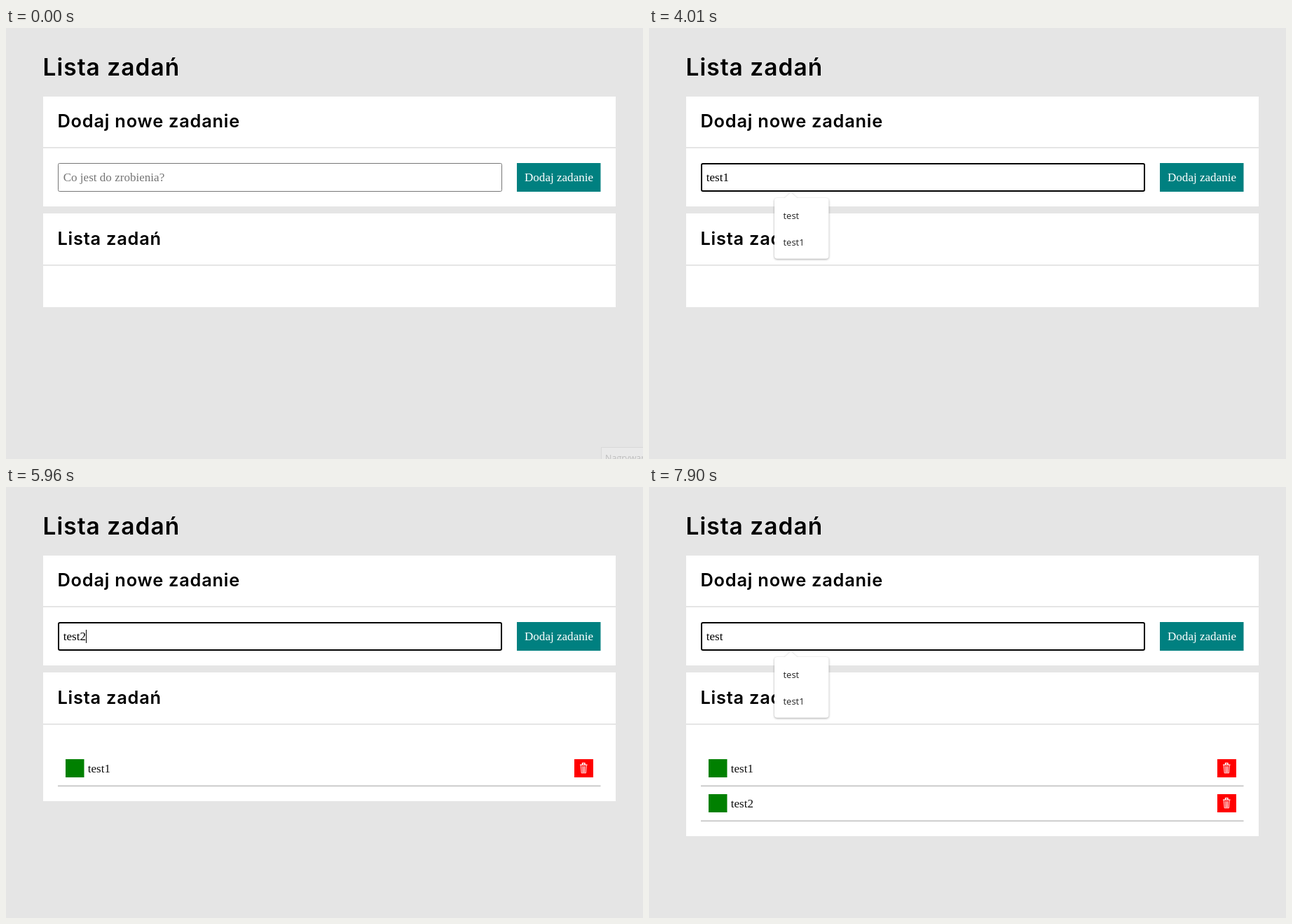
An HTML page for the animation above (7990 ms loop, 909 by 616 pixels).

```html
<!DOCTYPE html>
<html lang="pl">
<head>
<meta charset="utf-8">
<title>Lista zadań</title>
<style>
  html, body { margin: 0; width: 100%; height: 100%; overflow: hidden; background: #e5e5e5; }
  svg { display: block; width: 909px; height: 616px; font: 17.07px "Liberation Serif", serif; }
  h1, .title { font-family: Inter, sans-serif; font-weight: 600; letter-spacing: .03em; }
  .main { font-size: 33.5px; }
  .section { font-size: 25.4px; }
  .ui { font: 13px "Open Sans", sans-serif; fill: #222; }
  #popup { filter: drop-shadow(0 1px 1.5px rgba(0, 0, 0, .35)); }
  #toast { font-size: 12.5px; fill: #bdbdbd; }
</style>
</head>
<body>
<svg viewBox="0 0 909 616">
  <defs>
    <g id="row">
      <rect x="85" y="389" width="26.5" height="26" fill="green"/>
      <rect x="811" y="389" width="27" height="26" fill="red"/>
      <g fill="none" stroke="#fff">
        <path d="M819 397.2h10.5M822.5 396.5v-1.8h3.5v1.8" stroke-width="1.3"/>
        <path d="M820.3 398l.9 10.8h6.2l.9-10.8M822.6 399l.3 9M824.3 399v9M826 399l-.3 9" stroke-width=".9"/>
      </g>
      <rect x="74" y="426.6" width="774.5" height="1.4" fill="#bbb"/>
    </g>
  </defs>

  <rect width="909" height="616" fill="#e5e5e5"/>
  <text class="title main" x="52.5" y="68">Lista zadań</text>

  <g fill="#fff">
    <rect x="53" y="98" width="817" height="72"/>
    <rect x="53" y="172" width="817" height="83"/>
    <rect x="53" y="265" width="817" height="73"/>
    <rect id="list" x="53" y="340" width="817" height="59"/>
  </g>
  <text class="title section" x="73.5" y="142">Dodaj nowe zadanie</text>
  <text class="title section" x="73.5" y="310">Lista zadań</text>

  <rect id="field" fill="#fff"/>
  <text id="hint" x="81.7" y="219" fill="#757575">Co jest do zrobienia?</text>
  <text id="typed" x="81.7" y="219"></text>
  <rect id="caret" y="204" width="1" height="19"/>

  <rect x="729" y="193" width="119.5" height="41" fill="teal"/>
  <text x="740" y="219" fill="#fff">Dodaj zadanie</text>

  <g class="row"><use href="#row"/><text x="116.7" y="408" fill="#111">test1</text></g>
  <g class="row"><use href="#row" y="50"/><text x="116.7" y="458" fill="#111">test2</text></g>

  <g id="popup">
    <path d="M192.5 244l10-9 10 9z" fill="#fff"/>
    <rect id="box" x="179" y="243" rx="4" fill="#fff"/>
    <g id="items" class="ui"></g>
  </g>

  <g id="toast">
    <rect x="849.5" y="599.5" width="70" height="30" fill="#e9e9e9" stroke="#d9d9d9"/>
    <text class="ui" x="855" y="618.5" style="font-size:12.5px;fill:#bdbdbd">Nagrywanie</text>
  </g>
</svg>
<script>
const LOOP = 7990, FOCUS = 1860, FADE_STEP = 67;
const $ = id => document.getElementById(id);
const rows = document.querySelectorAll('.row');

// [time, field text, caret visible]
const events = [
  [0, '', 0], [FOCUS, '', 1], [2460, '', 0],
  [2660, 't', 1], [2730, 'te', 1], [2930, 'tes', 1], [3150, 'test', 1], [3480, 'test1', 1], [4010, 'test1', 0],
  [4080, '', 1], [4550, '', 0],
  [4750, 't', 1], [4810, 'te', 1], [5010, 'tes', 1], [5280, 'test', 1], [5750, 'test2', 1],
  [6160, '', 1], [6820, '', 0],
  [6890, 't', 1], [6960, 'te', 1], [7160, 'tes', 1], [7370, 'test', 1], [7900, 'test', 0]
];
const added = [4080, 6160];
const history = ['test', 'tes', 'test1', 'trening', 'tor'];

// The exact short form drops out once the text is longer than it.
const suggestions = text => history.filter(word => word.startsWith(text));

function setAttrs(node, attrs) {
  for (const name in attrs) node.setAttribute(name, attrs[name]);
}

function drawField(text, caretOn, focused) {
  setAttrs($('field'), focused
    ? { x: 75, y: 194, width: 632, height: 39, rx: 2, stroke: '#000', 'stroke-width': 2 }
    : { x: 74.5, y: 193.5, width: 633, height: 40, rx: 2, stroke: '#767676', 'stroke-width': 1 });
  $('hint').style.display = text ? 'none' : '';
  $('typed').textContent = text;
  const width = text ? $('typed').getComputedTextLength() : 0;
  setAttrs($('caret'), { x: Math.floor(82 + width), opacity: caretOn });
}

function drawPopup(text, elapsed) {
  const closing = text.length === 5;
  const opacity = !text ? 0 : closing ? Math.max(0, 1 - Math.floor(elapsed / FADE_STEP) / 3) : 1;
  $('popup').style.opacity = opacity;
  if (!opacity) return;
  const words = suggestions(closing ? 'test' : text);
  setAttrs($('box'), { width: text === 't' ? 90 : 77.5, height: 10 + 38.4 * words.length });
  $('items').innerHTML = words
    .map((word, i) => `<text x="191.5" y="${272.5 + 38.3 * i}">${word}</text>`).join('');
}

function draw(time) {
  const [start, text, caretOn] = events.findLast(event => event[0] <= time);
  const count = added.filter(at => at <= time).length;
  drawField(text, caretOn, time >= FOCUS);
  drawPopup(text, time - start);
  rows.forEach((row, i) => row.style.display = i < count ? '' : 'none');
  setAttrs($('list'), { height: 59 + 50 * count });
  $('toast').style.display = time < 70 ? '' : 'none';
}

const origin = performance.now();
function tick() {
  draw((performance.now() - origin) % LOOP);
  requestAnimationFrame(tick);
}
tick();
</script>
</body>
</html>
```
